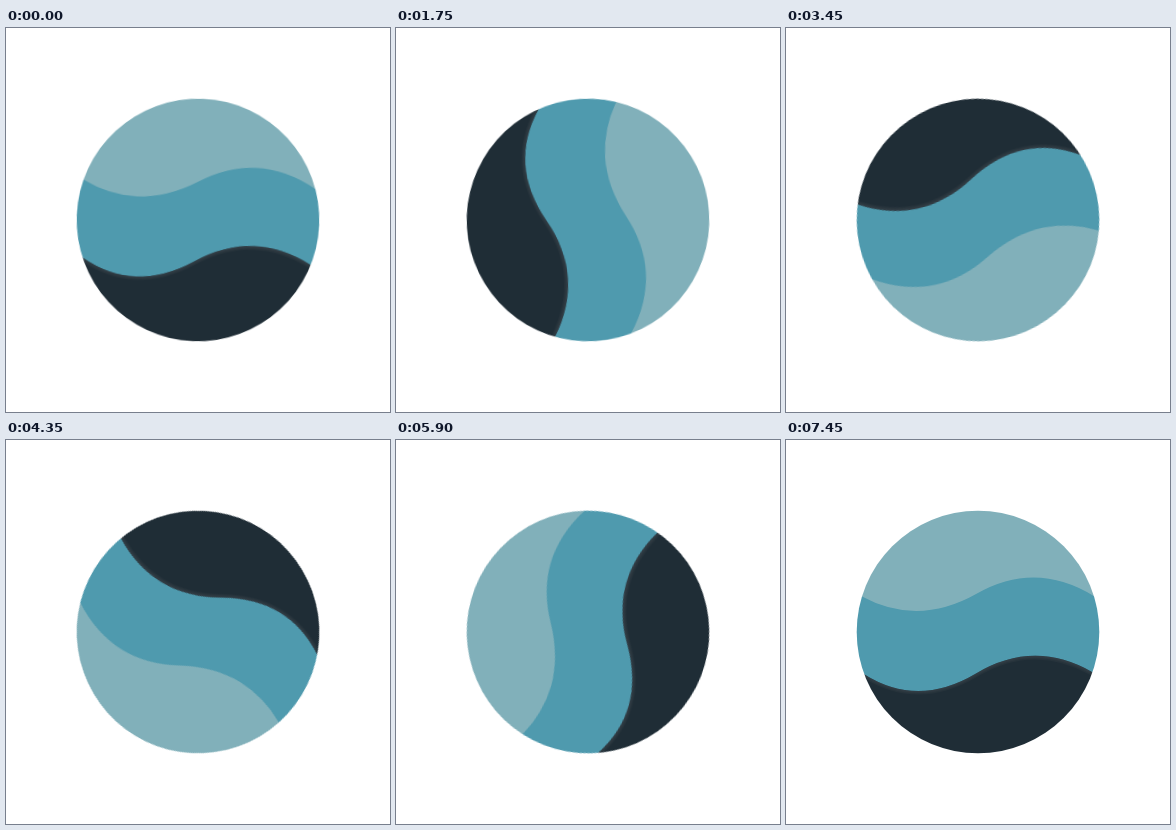
Write an HTML page without scripts that moves like this. It is 384 px wide and 384 px high and loops after 7.5 s.

```html
<!DOCTYPE html>
<html lang="en">
<head>
<meta charset="utf-8">
<title>Rolling waves</title>
<style>
  html, body { margin: 0; width: 100%; height: 100%; overflow: hidden; background: #fff; }
  svg { display: block; width: 100vw; height: 100vh; }
  .disc {
    transform-origin: 192px 192px;
    animation: roll 7.5s steps(150) infinite;
  }
  .light { fill: #81b0ba; }
  .mid { fill: #4f9aae; }
  .dark { fill: #1f2d36; }
  .rim { fill: none; stroke: #4a5558; stroke-opacity: .16; }
  @keyframes roll {
    from { transform: rotate(2.4deg); }
    to { transform: rotate(362.4deg); }
  }
</style>
</head>
<body>
<svg viewBox="0 0 384 384">
  <defs>
    <clipPath id="round"><circle cx="192" cy="192" r="121.3"/></clipPath>
    <path id="low" d="M60 222L78.5 234.5Q132 268 190 233.5T306 232L325 245V330H60Z"/>
    <clipPath id="inner"><use href="#low"/></clipPath>
  </defs>
  <g class="disc">
    <g clip-path="url(#round)">
      <circle class="light" cx="192" cy="192" r="125"/>
      <path class="mid" d="M60 147L75.5 156.3Q132 187 191 153.6T308.5 156.5L325 166V330H60Z"/>
      <use class="dark" href="#low"/>
      <g class="rim" clip-path="url(#inner)">
        <use href="#low" stroke-width="7"/>
        <use href="#low" stroke-width="4.5"/>
        <use href="#low" stroke-width="2.5"/>
      </g>
    </g>
  </g>
</svg>
</body>
</html>
```
